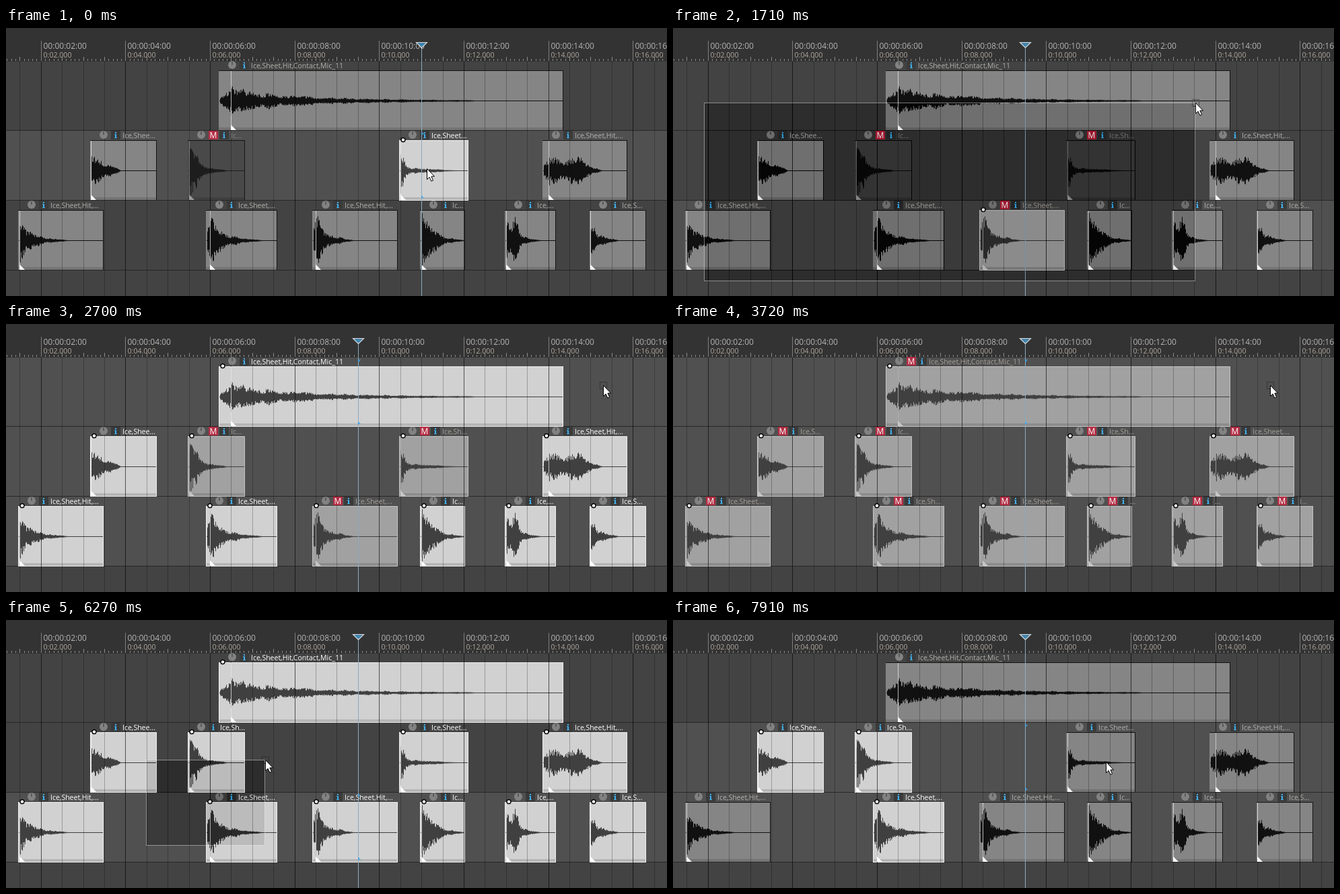
Animation, 982 px wide and 399 px high, one loop 8 s. Source, as an HTML page with a canvas:

```html
<!DOCTYPE html>
<html lang="en">
<head>
<meta charset="utf-8">
<title>Muting audio items</title>
<style>
html, body { margin: 0; width: 100%; height: 100%; overflow: hidden; background: #434343; }
canvas { display: block; }
</style>
</head>
<body>
<canvas id="stage" width="982" height="399"></canvas>
<script>
const W = 982, H = 399, LOOP = 8000, STEP = 120;
const ctx = document.getElementById('stage').getContext('2d');
const FONT = '"Open Sans", "Noto Sans", sans-serif';
const LABEL = 'Ice,Sheet,Hit,Contact,Mic_11';
const rowTop = r => Math.min(H, r ? 50 + r * 104 - 1 : 50);
const timeX = s => Math.floor(52.2 + (s - 2) * 62.825);

// chars: label letters that fit; sync: snap point in seconds;
// peak, tau, len: wave height, decay and length; swell: offset of a second burst
const item = (row, x, w, chars, sync, peak, tau, len, swell = 0) =>
  ({ row, x, w, chars, snap: timeX(sync), peak, tau, len, swell, top: row ? rowTop(row) + 15 : 64 });

const ITEMS = [
  item(0, 316, 511, 28, 6.5, 19, 110, 362),
  item(1, 125, 98, 8, 3.18, 26, 28, 44),
  item(1, 270, 84, 6, 5.5, 42, 17, 56),
  item(1, 584, 102, 9, 10.5, 32, 9, 84),
  item(1, 797, 125, 14, 14, 25, 30, 80, 44),
  item(2, 18, 126, 14, 1.5, 34, 18, 72),
  item(2, 297, 105, 10, 6, 42, 22, 78),
  item(2, 455, 126, 14, 8.5, 42, 17, 56),
  item(2, 615, 66, 2, 11, 43, 18, 64),
  item(2, 741, 75, 4, 13, 31, 15, 52, 14),
  item(2, 867, 83, 5, 15, 33, 13, 42)
];
const ALL = ITEMS.map((_, i) => i);

function random(seed) {
  return () => {
    seed = (seed * 1664525 + 1013904223) >>> 0;
    return seed / 4294967296;
  };
}

function envelope({ x, snap, peak, tau, len, swell }, d) {
  if (d < 0) return 0.65 * peak * Math.sqrt(Math.max(0, 1 + d / (snap - x)));
  const decay = peak * (0.25 * Math.exp(-d / 4) + 0.75 * Math.exp(-d / tau));
  const tail = 0.12 * peak * (1 - d / len);
  const burst = swell ? 0.55 * peak * Math.exp(-(((d - swell) / (swell / 3)) ** 2)) : 0;
  return (Math.max(decay, tail) + burst) * Math.min(1, (len - d) / 8);
}

// lumps a few pixels wide, with finer spikes on top
ITEMS.forEach((it, i) => {
  const rnd = random(77 + i * 991);
  let from = 0.9, to = 1;
  it.wave = [];
  for (let x = it.x + 2; x < it.snap + it.len; x++) {
    const k = (x - it.x) % 6;
    if (!k) [from, to] = [to, 0.55 + 0.8 * rnd()];
    const a = envelope(it, x - it.snap) * (from + (to - from) * k / 6);
    const spike = () => Math.min(42, a * (0.55 + 0.6 * rnd()));
    it.wave.push([x, spike(), spike()]);
  }
});

// time, selected items, muted items, bright rows, row with playhead marks
const STATES = [
  [0, [3], [2], [1], 1],
  [120, [3], [2, 3], [1], 1],
  [390, [7], [2, 3], [2], 2],
  [540, [7], [2, 3, 7], [2], 2],
  [1320, [7], [2, 3, 7], [2], -1],
  [2570, ALL, [2, 3, 7], [0, 1, 2], 0],
  [3720, ALL, ALL, [0, 1, 2], 0],
  [4650, ALL, [], [0, 1, 2], 0],
  [6000, ALL, [], [2], 2],
  [6510, [1, 2, 6], [], [1, 2], 1],
  [6880, [1, 2, 6], [1, 2, 6], [1, 2], 1],
  [7280, [1, 2, 6], [], [1, 2], 1]
];

// time of the first step, number of steps, destination
const MOVES = [
  [0, 1, 625, 209], [120, 3, 519, 294], [540, 1, 503, 311], [690, 4, 84, 372],
  [1200, 2, 46, 377], [1440, 1, 59, 377], [1590, 3, 866, 78], [2020, 2, 902, 64],
  [2570, 2, 887, 91], [4800, 2, 868, 104], [5070, 4, 489, 284], [5580, 2, 288, 290],
  [5880, 2, 208, 336], [6120, 2, 385, 208], [6390, 2, 441, 215],
  [7550, 2, 560, 319], [7790, 1, 665, 268], [7910, 1, 643, 211]
];
const DRAGS = [[1320, 2570], [6000, 6510]];

const latest = (list, t) => list.reduce((found, step) => (step[0] <= t ? step : found));

function mouseAt(t) {
  const move = latest(MOVES, t), [start, steps, x, y] = move;
  const [, , x0, y0] = MOVES[Math.max(0, MOVES.indexOf(move) - 1)];
  const k = Math.min(1, (1 + Math.floor((t - start) / STEP)) / steps);
  const p = 1 - (1 - k) ** 2;
  return [Math.round(x0 + (x - x0) * p), Math.round(y0 + (y - y0) * p)];
}

function rect(color, x, y, w, h) {
  ctx.fillStyle = color;
  ctx.fillRect(x, y, w, h);
}

function frameRect(color, x, y, w, h) {
  ctx.strokeStyle = color;
  ctx.lineWidth = 1;
  ctx.strokeRect(x + 0.5, y + 0.5, w - 1, h - 1);
}

function text(str, x, y, size, color) {
  ctx.font = `${size}px ${FONT}`;
  ctx.fillStyle = color;
  ctx.fillText(str, x, y);
}

function paint(fill, stroke, line = 1) {
  ctx.fillStyle = fill;
  ctx.fill();
  if (!stroke) return;
  ctx.strokeStyle = stroke;
  ctx.lineWidth = line;
  ctx.stroke();
}

function shape(points, ...style) {
  ctx.beginPath();
  points.forEach(([x, y]) => ctx.lineTo(x, y));
  ctx.closePath();
  paint(...style);
}

function disc(x, y, r, ...style) {
  ctx.beginPath();
  ctx.arc(x, y, r, 0, Math.PI * 2);
  paint(...style);
}

function drawRows(bright) {
  for (let r = 0; r < 4; r++) {
    rect(bright.includes(r) ? '#505050' : '#434343', 0, rowTop(r), W, H);
    if (r) rect('#272727', 0, rowTop(r) - 1, W, 1);
  }
}

function drawRuler() {
  rect('#333333', 0, 0, W, 50);
  for (let i = 11; i < 170; i++) {
    const h = i % 5 ? 3 : 6;
    rect('#8a8a8a', timeX(i / 10), 49 - h, 1, h);
  }
  for (let s = 2; s <= 16; s += 2) {
    const x = timeX(s), n = String(s).padStart(2, '0');
    rect('#7d7d7d', x, 19, 1, 30);
    text(`00:00:${n}:00`, x + 3.5, 31, 12, '#b2b2b2');
    text(`0:${n}.000`, x + 3.5, 44, 10.6, '#b0a69c');
  }
}

function drawGrid() {
  for (let i = 3; i < 34; i++) {
    rect(i % 4 ? 'rgba(0,0,0,.26)' : 'rgba(0,0,0,.62)', timeX(i / 2), 50, 1, H - 50);
  }
}

function drawBody(it, selected, muted) {
  const { x, w, top } = it, mid = top + 44;
  const fill = selected ? (muted ? '#a1a1a1' : '#d1d1d1') : (muted ? '#494949' : '#858585');
  const ink = selected ? '#404040' : (muted ? '#1d1d1d' : '#111111');
  rect(fill, x, top, w, 88);
  rect('rgba(0,0,0,.13)', x, top + 84, w, 4);
  if (selected) {
    frameRect(muted ? '#c4c4c4' : '#efefef', x, top - 1, w + 1, 90);
  } else {
    rect('#141414', x, top - 1, w + 1, 1);
    rect('#141414', x + w, top, 1, 88);
  }
  rect(ink, x + 1, mid, w - 1, 1);
  for (const [px, up, down] of it.wave) rect(ink, px, mid - up, 1, up + down + 1);
}

function drawSnap({ snap, top }, selected, muted) {
  const color = muted ? (selected ? '#c6c6c6' : '#9c9c9c') : '#ffffff';
  ctx.globalAlpha = 0.7;
  rect(color, snap, top, 1, 88);
  ctx.globalAlpha = 1;
  shape([[snap, top + 80], [snap + 8, top + 88], [snap, top + 88]], color);
}

function labelText(chars, muted) {
  const cut = n => LABEL.slice(0, n) + (n < LABEL.length ? '...' : '');
  if (!muted || chars === LABEL.length) return cut(chars);
  ctx.font = `10.5px ${FONT}`;
  const width = n => ctx.measureText(cut(n)).width;
  const room = width(chars) - 15.2;
  let n = chars;
  while (n > 0 && width(n) > room) n--;
  return cut(n);
}

function drawLabel(it, selected, muted) {
  const y = it.top - 9;
  let x = it.x + 20;
  disc(x, y, 6, '#828282');
  rect('#353535', x - 0.5, y - 5, 1, 5);
  x += 18;
  if (muted) {
    rect('#b32d43', x - 7, y - 6, 14, 13);
    text('M', x - 5.4, y + 5, 12, '#ffffff');
    x += 16;
  }
  rect('#3a3a3a', x - 7, y - 6, 14, 13);
  const blue = '#40aeea';
  rect(blue, x - 1, y - 4, 2, 2);
  rect(blue, x - 2, y - 1, 3, 1);
  rect(blue, x - 1, y - 1, 2, 6);
  rect(blue, x - 2, y + 4, 4, 1);
  const color = selected ? (muted ? '#a5a09a' : '#ffffff') : (muted ? '#858585' : '#b2b0ac');
  text(labelText(it.chars, muted), x + 10, y + 5, 10.5, color);
  if (selected) disc(it.x + 6, it.top - 1.5, 3, '#ffffff', '#000000', 1.4);
}

function drawPlayhead(x, row) {
  rect('#8cabc0', x, 28, 1, H - 28);
  shape([[x - 7.5, 21.5], [x + 8.5, 21.5], [x + 0.5, 29.5]], '#3f83ad', '#d8d8d8', 1.2);
  if (row < 0) return;
  const top = rowTop(row) + 3, bottom = rowTop(row + 1) - 5;
  for (const [y, stem] of [[top, top], [bottom, bottom - 2]]) {
    rect('#3da5e8', x, y, 4, 1);
    rect('#3da5e8', x, stem, 2, 3);
  }
}

function drawMarquee([x0, y0], [x1, y1]) {
  const x = Math.min(x0, x1), y = Math.min(y0, y1), w = Math.abs(x1 - x0), h = Math.abs(y1 - y0);
  if (!w || !h) return;
  ctx.globalCompositeOperation = 'difference';
  rect('rgb(22,22,22)', x, y, w, h);
  ctx.globalCompositeOperation = 'source-over';
  frameRect('rgba(255,255,255,.45)', x, y, w, h);
}

function drawCursor([x, y], dotted) {
  if (dotted) {
    for (let i = -5; i <= 5; i += 2) {
      for (const [dx, dy] of [[i, -5], [i, 5], [-5, i], [5, i]]) rect('#1c1c1c', x + dx, y + dy, 1, 1);
    }
  }
  const arrow = [[0, 0], [0, 16], [3.6, 12.6], [6.4, 18.6], [9, 17.4], [6.4, 11.5], [11, 11.5]];
  shape(arrow.map(([dx, dy]) => [x + 0.5 + dx, y + 0.5 + dy]), '#ffffff', '#000000');
}

function draw(t) {
  const [, selected, muted, bright, markRow] = latest(STATES, t);
  const mouse = mouseAt(t), [mx, my] = mouse;
  const drag = DRAGS.find(([from, to]) => t >= from && t < to);
  const each = fn => ITEMS.forEach((it, i) => fn(it, selected.includes(i), muted.includes(i)));
  const overItem = ITEMS.some(it =>
    mx >= it.x && mx <= it.x + it.w && my >= it.top && my <= it.top + 88);

  drawRows(bright);
  each(drawBody);
  drawGrid();
  each(drawSnap);
  drawRuler();
  each(drawLabel);
  drawPlayhead(timeX(t < 390 ? 11 : 9.5), markRow);
  if (drag) drawMarquee(mouseAt(drag[0]), mouse);
  drawCursor(mouse, drag || !overItem);
}

const start = performance.now();
function frame() {
  draw((performance.now() - start) % LOOP);
  requestAnimationFrame(frame);
}
frame();
</script>
</body>
</html>
```
